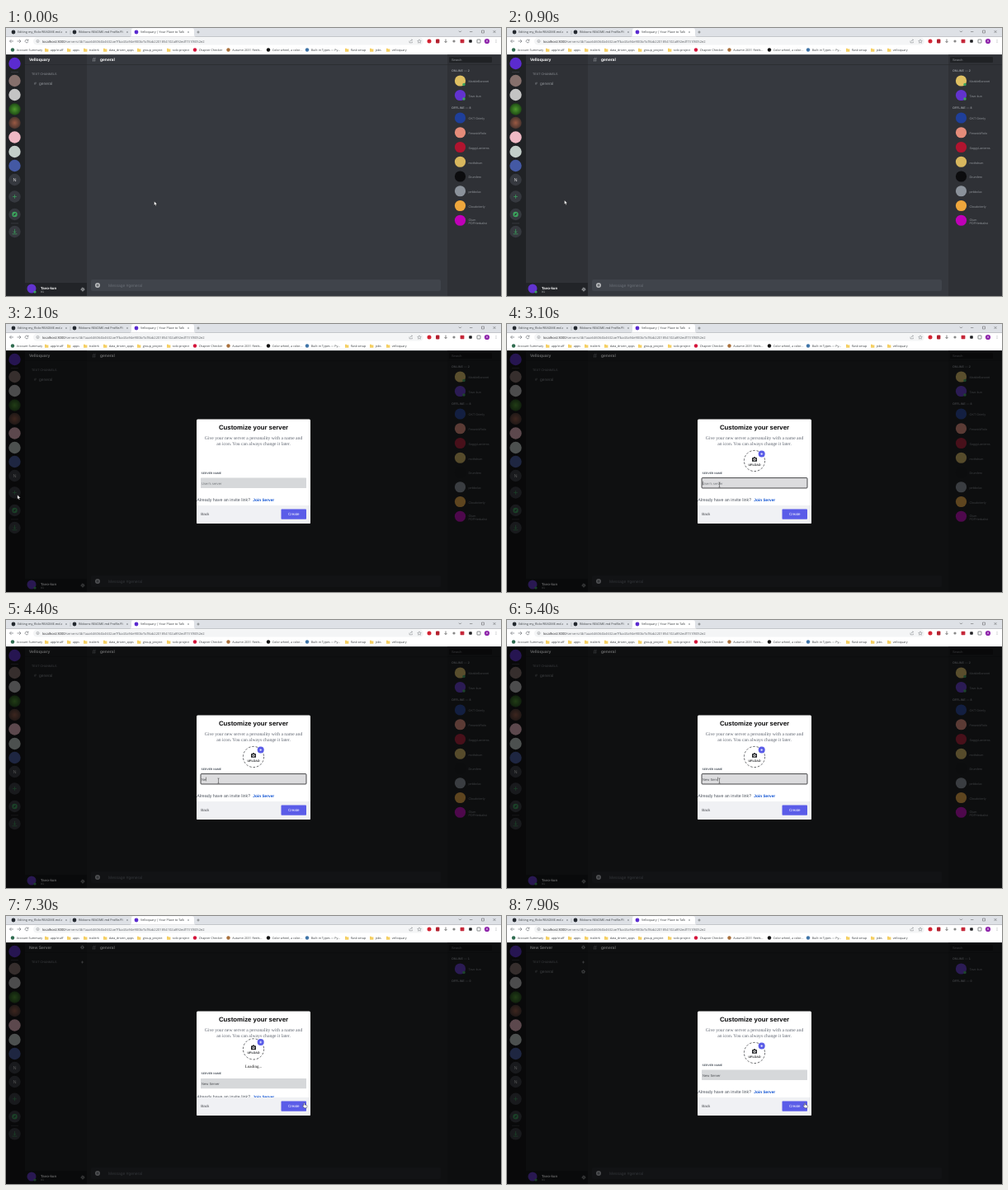
An HTML page that plays this animation: 600 px wide and 325 px high, repeating every 8 s.

```html
<!DOCTYPE html>
<html lang="en">
<head>
<meta charset="utf-8">
<title>Create a server</title>
<style>
html, body { margin: 0; width: 100%; height: 100%; overflow: hidden; background: #36393f; }
svg { display: block; width: 100vw; height: 100vh; }
svg svg { width: auto; height: auto; }
text { font-family: "Liberation Sans", Arial, sans-serif; white-space: pre; text-rendering: geometricPrecision; }
.ui { font-family: "Open Sans", sans-serif; }
.serif { font-family: "Liberation Serif", serif; }
.b { font-weight: 700; }
.mid { text-anchor: middle; }
</style>
</head>
<body>
<svg id="stage" viewBox="0 0 600 325" xmlns="http://www.w3.org/2000/svg"></svg>
<script>
const LOOP = 8000, TOP = 32.4;
const GREY = '#8e9297', LIGHT = '#b9bbbe', GREEN = '#3ba55d', BLURPLE = '#5a5ce8', INK = '#44474c';

const text = (x, y, size, str, fill, cls = '') =>
  `<text x="${x}" y="${y}" font-size="${size}" fill="${fill}" class="${cls}">${str}</text>`;
const rect = (x, y, w, h, fill, r = 0, more = '') =>
  `<rect x="${x}" y="${y}" width="${w}" height="${h}" rx="${r}" fill="${fill}" ${more}/>`;
const disc = (x, y, r, fill, more = '') => `<circle cx="${x}" cy="${y}" r="${r}" fill="${fill}" ${more}/>`;
const line = (d, stroke, w = 0.6, more = '') =>
  `<path d="${d}" fill="none" stroke="${stroke}" stroke-width="${w}" ${more}/>`;
const group = (id, body, more = '') => `<g id="${id}" ${more}>${body}</g>`;
const plus = (x, y, r, c, w) => line(`M${x - r} ${y}h${2 * r}M${x} ${y - r}v${2 * r}`, c, w);
const cross = (x, y, r, c, w) =>
  line(`M${x - r} ${y - r}l${2 * r} ${2 * r}M${x + r} ${y - r}l${-2 * r} ${2 * r}`, c, w);
const gear = (x, y, c = LIGHT) =>
  disc(x, y, 1.3, 'none', `stroke="${c}" stroke-width=".9"`) +
  disc(x, y, 2, 'none', `stroke="${c}" stroke-width=".8" stroke-dasharray=".8 .77"`);

function browser() {
  const tabs = [
    [9, '#24292f', 'Editing my_flickr/README.md at m'],
    [83, '#24292f', 'Ribbons-README.md Profile/Fi'],
    [158, '#5b2bd0', 'Velloquary | Your Place to Talk a']
  ];
  let s = rect(0, 0, 600, 10.6, '#dee1e6') + rect(0, 10.6, 600, TOP - 10.6, '#fff');
  s += '<path d="M150 10.600q2 0 2-2V2.500q0-2.300 2.300-2.300h71.400q2.300 0 2.300 2.300v6.100q0 2 2 2z" fill="#fff"/>';
  s += line('M78 3v5', '#8a8d91', 0.4);
  tabs.forEach(([x, c, label], i) => {
    s += disc(x, 5, 2.4, c) +
      `<clipPath id="tab${i}">${rect(x, 0, 59, 10, '#000')}</clipPath>` +
      `<g clip-path="url(#tab${i})">${text(x + 5, 6.4, 3.75, label, '#3c4043', 'ui')}</g>` +
      cross(73 + i * 74, 5, 1, '#5f6368', 0.4);
  });
  s += plus(233, 5, 1.6, '#3c4043', 0.5) + line('M549 3.6l1.4 1.4 1.4-1.4', '#333', 0.5) +
    line('M562 4.5h3.4M576.5 3h3v3h-3z', '#333', 0.4) + cross(592, 4.5, 1.5, '#333', 0.4);
  // toolbar
  s += line('M9 16H4.5M6.5 14l-2 2 2 2', '#5f6368', 0.6) +
    line('M13.5 16H18M16 14l2 2-2 2', '#5f6368', 0.6) +
    line('M26.6 14.8a1.9 1.9 0 1 0 .3 1.7M27 13.6v1.6h-1.6', '#5f6368', 0.6) +
    rect(33, 11.6, 473, 9, '#f4f5f6', 4.5) +
    disc(38.5, 16, 1.6, 'none', 'stroke="#5f6368" stroke-width=".4"') + line('M38.5 15.8v1.1', '#5f6368', 0.4) +
    text(44, 17.5, 4.1, 'localhost:3000<tspan fill="#5f6368">/servers/4b7aaa646064b4632ae7fba43a94e900b/5cf8ab2201854102a892edf731f8052e2</tspan>', '#202124', 'ui') +
    line('M489 15.5v2.3h3.4v-1.4M490.3 16q.2-1.6 2-1.6M491.6 13.5l1 .9-1 .9', '#5f6368', 0.4) +
    '<path d="M501 13.8l.7 1.5 1.6.2-1.2 1.1.3 1.6-1.4-.8-1.4.8.3-1.6-1.2-1.1 1.6-.2z" fill="none" stroke="#5f6368" stroke-width=".4"/>' +
    disc(513, 16, 2.5, '#d32232') + rect(521, 13.6, 4.4, 4.8, '#b3202e', 1) +
    line('M533 13.5v4M531.5 16l1.5 1.6 1.5-1.6', '#333', 0.6) + disc(543, 16, 1.6, '#888') +
    rect(550.6, 13.8, 4.8, 4.4, '#c5283a', 0.6) + rect(561.2, 14.2, 3.6, 3.6, '#202124', 0.8) +
    rect(571, 14, 4, 4, 'none', 0.5, 'stroke="#3c4043" stroke-width=".6"') +
    disc(583, 16, 3.1, '#8e24aa') + text(583, 17.4, 3.8, 'A', '#fff', 'mid');
  for (const y of [14.3, 16, 17.7]) s += disc(594, y, 0.4, '#5f6368');
  // bookmarks
  const marks = [
    [8, 'Account Summary', '#2f6b4f'], [49, 'app/stuff'], [76, 'apps'], [96, 'trailerk'],
    [120, 'data_driven_apps'], [161, 'group_project'], [197, 'solo-project'],
    [229, 'Chapter Checker', '#d4143a'], [269.5, 'Autumn 2031 Reels...', '#a9703c'],
    [318, 'Color wheel, a color...', '#111'], [365, 'Built-in Types — Py...', '#3f74a8'],
    [413, 'flask setup'], [443, 'jobs'], [463, 'velloquary']
  ];
  for (const [x, label, c] of marks) {
    s += c ? disc(x, 26.5, 2.2, c)
      : `<path d="M${x - 2} 24.7h1.6l.6.7h2.2v3.4h-4.4z" fill="#f5cf62"/>`;
    s += text(x + 4.7, 27.9, 3.7, label, '#3c4043', 'ui');
  }
  return s;
}

function panels() {
  const column = (x, w, c) => rect(x, TOP, w, 325 - TOP, c);
  return column(0, 600, '#36393f') + column(0, 23, '#202225') +
    column(23, 75, '#2f3136') + column(535, 65, '#2f3136') +
    rect(23, 309, 75, 16, '#222428') + rect(23, 44, 577, 0.6, '#25272b') +
    rect(103, 305, 424, 14, '#40444b', 2) + rect(537, 35, 52, 7, '#202225', 1);
}

function rail() {
  const icons = [
    [64, '#86706c'], [81, '#c4c4c4'], [98.5, 'url(#leaf)'], [115, 'url(#dusk)'],
    [132.5, '#efb9c4'], [150, '#c3cec9'], [167, '#4459a4']
  ];
  const button = y => disc(10.5, y, 7.2, '#36393f');
  const letter = y => button(y) + text(10.5, y + 2, 5.6, 'N', '#dcddde', 'mid');
  let s = disc(10.5, 43, 7.2, '#5b2bd0') + rect(6, 53.2, 9, 0.6, '#42454b');
  for (const [y, c] of icons) s += disc(10.5, y, 7.2, c);
  s += letter(184) + group('added', letter(201));
  s += group('tools',
    button(204.5) + plus(10.5, 204.5, 2.4, GREEN, 0.7) +
    button(226) + disc(10.5, 226, 3.2, GREEN) + '<path d="M12.2 224.3l-1 2.4-2.4 1 1-2.4z" fill="#36393f"/>' +
    rect(6, 236.6, 9, 0.6, '#42454b') +
    button(247) + line('M10.5 243.8v4.4M8.8 246.6l1.7 1.8 1.7-1.8M7.6 249.8h5.8', GREEN, 0.7));
  return s;
}

function member(y, color, name, online) {
  const [a, b] = name.split('|');
  return disc(550.5, y, 6.6, color) + (online ? disc(555, y + 4.5, 1.7, GREEN) : '') +
    (b ? text(560.5, y + 0.6, 3.75, a, GREY) + text(560.5, y + 5, 3.75, b, GREY)
       : text(560.5, y + 2.4, 3.75, name, GREY));
}

function members() {
  const offline = [
    ['#1f3f9a', 'OKT Grimly'], ['#e58c7a', 'FenwickRolo'], ['#b0142f', 'SoggyLanterns'],
    ['#d8b75e', 'mothdrum'], ['#0c0c0e', 'Drumfern'], ['#8b929b', 'pebbolux'],
    ['#eea63c', 'Cloudotterly'], ['#c000b8', 'Glum|PDFHerbalist']
  ];
  const head = (y, s) => text(540, y, 3.7, s, GREY, 'b');
  const full = head(53, 'ONLINE — 2') + member(64, '#dfc062', 'MarbleBaronet', true) +
    member(81.5, '#6233cf', 'Tavo-kun', true) + head(98.3, 'OFFLINE — 8') +
    offline.map(([c, n], i) => member(109 + i * 17.75, c, n)).join('');
  const solo = head(53, 'ONLINE — 1') + member(64, '#6233cf', 'Tavo-kun', true) + head(80.3, 'OFFLINE — 0');
  return group('full', full) + group('solo', solo);
}

function content() {
  return rail() + `<text id="title" x="28" y="39.8" font-size="5" fill="#fff" class="b"></text>` +
    text(31, 57, 3.7, 'TEXT CHANNELS', GREY) +
    group('channel', text(34, 69.3, 5, '#', GREY) + text(40, 69.3, 4.9, 'general', GREY)) +
    group('ownGears', gear(92.5, 38) + plus(92.5, 56, 1.5, LIGHT, 0.6)) + group('channelGear', gear(92.5, 67.5)) +
    text(104.5, 41, 8, '#', GREY) + text(114, 40, 5, 'general', '#fff', 'b') +
    text(540, 40, 3.9, 'Search', GREY) + members() +
    disc(111, 312, 3, LIGHT) + plus(111, 312, 1.6, '#40444b', 0.8) +
    text(124, 313.6, 5, 'Message #general', '#686d75') +
    disc(31, 316, 5.5, '#6233cf') + disc(35, 320, 1.6, GREEN) +
    text(42, 316.6, 4.4, 'Tavo-kun', '#fff', 'b') + text(42, 321.4, 3.6, '#1', LIGHT) + gear(93, 317);
}

function modal() {
  const upload =
    disc(300, 166, 12.6, 'none', 'stroke="#2b2d31" stroke-width=".7" stroke-dasharray="2.6 1.8"') +
    '<path d="M297 162.2h1.4l.7-1h1.8l.7 1h1.4v4.6h-6z" fill="#202225"/>' +
    disc(300, 164.3, 1.5, '#fff') + disc(300, 164.3, 0.8, '#202225') +
    text(300, 171.7, 3.55, 'UPLOAD', '#202225', 'b mid') +
    disc(308.7, 157.6, 4, BLURPLE) + plus(308.7, 157.6, 1.4, '#fff', 0.7);
  const field = text(236.6, 182.2, 3.35, 'SERVER NAME', '#4f5660', 'b') +
    '<rect id="box" x="236" y="186.6" width="128" height="12.4" stroke-width=".8"/>' +
    '<text id="value" x="237" y="194.6" font-size="4.167"></text>' +
    '<rect id="caret" y="190.6" width=".4" height="4.8" fill="#111"/>';
  return rect(231, 115.5, 138, 126.5, '#fff', 1.5) +
    text(300, 127.6, 7.8, 'Customize your server', '#060607', 'b mid') +
    text(300, 140.4, 5.7, 'Give your new server a personality with a name and', '#5f6570', 'serif mid') +
    text(300, 146.6, 5.7, 'an icon. You can always change it later.', '#5f6570', 'serif mid') +
    group('upload', upload) + group('loading', text(300, 183.8, 5, 'Loading...', '#111', 'serif mid')) +
    group('field', field) +
    group('invite', text(231.3, 215.2, 5.33, 'Already have an invite link?', '#4f5660') +
      text(299.3, 215.2, 4.75, 'Join Server', '#0a4fd0', 'b')) +
    '<path d="M231 220h138v20.500q0 1.500-1.500 1.500h-135q-1.500 0-1.500-1.500z" fill="#f0f1f4"/>' +
    text(236.3, 232.3, 4.5, 'Back', INK) + rect(333.5, 224.6, 30.5, 12.2, BLURPLE, 0.8) +
    text(348.8, 232.3, 4.5, 'Create', '#fff', 'mid');
}

function cursors() {
  const edge = 'fill="#fff" stroke="#000" stroke-width=".35" stroke-linejoin="round"';
  return group('cursor',
    group('arrow', `<path d="M0 0v5.200l1.200-1.100.8 1.900.9-.4-.8-1.800h1.700z" ${edge}/>`) +
    group('hand', `<path d="M-.6.4q.6-.7 1.200 0v2l2.300.5q.7.300.6 1l-.5 2.300h-3.100l-1.900-2.500q-.2-.8.6-.7l.8.6z" ${edge}/>`) +
    group('beam', line('M-1-3h.8q.2 0 .2.3v5.400q0 .3-.2.3h-.8M1-3h-.8q-.2 0-.2.3M0 2.700q0 .3.2.3h.8', '#222', 0.45)));
}

const gradient = (id, a, b) =>
  `<radialGradient id="${id}"><stop offset="0" stop-color="${a}"/><stop offset="1" stop-color="${b}"/></radialGradient>`;

document.getElementById('stage').innerHTML =
  `<defs>${gradient('leaf', '#4d9a2c', '#1f4a16')}${gradient('dusk', '#9a5a44', '#4a342e')}</defs>` +
  browser() + panels() + group('shade', rect(0, TOP, 600, 325 - TOP, '#000', 0, 'opacity=".72"')) +
  group('content', content()) + group('modal', modal()) + cursors();

const el = {};
document.querySelectorAll('[id]').forEach(n => { el[n.id] = n; });
const show = (id, on) => el[id].setAttribute('display', on ? 'inline' : 'none');
const shift = (id, x, y) => el[id].setAttribute('transform', `translate(${x} ${y})`);

// pointer: time, x, y
const path = [
  [0, 179.5, 210], [400, 179.5, 210], [1200, 19, 208.2], [1400, 16.5, 208], [1600, 15.6, 208],
  [1980, 15.6, 208], [2080, 13.8, 207.3], [2150, 13.8, 207.3], [2800, 256, 195], [3000, 257.5, 195],
  [5950, 257.5, 195], [6400, 340, 227.5], [6530, 340, 227.5], [6800, 361.5, 226.6], [7300, 361.5, 226.6],
  [7600, 361, 226.6], [LOOP, 361, 226.6]
];
const word = 'New Server';
const keys = [4080, 4380, 4480, 4680, 4880, 5080, 5180, 5380, 5580, 5680];
const OPEN = 2080, FOCUS = 2800, CLICK = 6790, LOAD = 6890, JOIN = 7090, DONE = 7590;

function pointer(t) {
  const i = Math.max(1, path.findIndex(p => p[0] > t));
  const [t0, x0, y0] = path[i - 1], [t1, x1, y1] = path[i];
  const u = (t - t0) / (t1 - t0), k = u * u * (3 - 2 * u);
  return [x0 + (x1 - x0) * k, y0 + (y1 - y0) * k];
}

function draw(t) {
  const open = t >= OPEN, focus = t >= FOCUS && t < CLICK;
  const loading = t >= LOAD && t < DONE, joined = t >= JOIN;

  show('shade', open);
  show('modal', open);
  el.content.setAttribute('opacity', open ? 0.36 : 1);

  el.title.textContent = joined ? word : 'Velloquary';
  show('added', joined);
  shift('tools', 0, joined ? 17.3 : 0);
  show('full', !joined);
  show('solo', joined);
  show('channel', !joined || t >= DONE);
  show('ownGears', joined);
  show('channelGear', t >= DONE);

  show('upload', t >= 2180);
  show('loading', loading);
  shift('upload', 0, loading ? -4.6 : 0);
  shift('field', 0, loading ? 10.3 : 0);
  shift('invite', 0, loading ? 5.5 : 0);

  const typed = keys.filter(k => k <= t);
  el.value.textContent = typed.length ? word.slice(0, typed.length) : "User's server";
  el.value.setAttribute('fill', typed.length ? '#4c4e52' : '#777a7e');
  el.box.setAttribute('fill', focus ? '#dcdcde' : '#d6d8da');
  el.box.setAttribute('stroke', focus ? '#1c1d20' : 'none');
  el.box.setAttribute('rx', focus ? 0.9 : 0.4);
  const since = t - (typed.length ? typed[typed.length - 1] : FOCUS);
  show('caret', focus && since % 1000 < 500);
  el.caret.setAttribute('x', 237 + (typed.length ? el.value.getComputedTextLength() : 0));

  const [x, y] = pointer(t);
  shift('cursor', x, y);
  const beam = open && x > 236 && x < 364 && y > 186 && y < 199;
  const hand = open ? x > 333 && y > 224 : x < 18.5;
  show('beam', beam);
  show('hand', hand);
  show('arrow', !beam && !hand);
}

const start = performance.now();
function tick() {
  draw((performance.now() - start) % LOOP);
  requestAnimationFrame(tick);
}
tick();
</script>
</body>
</html>
```
